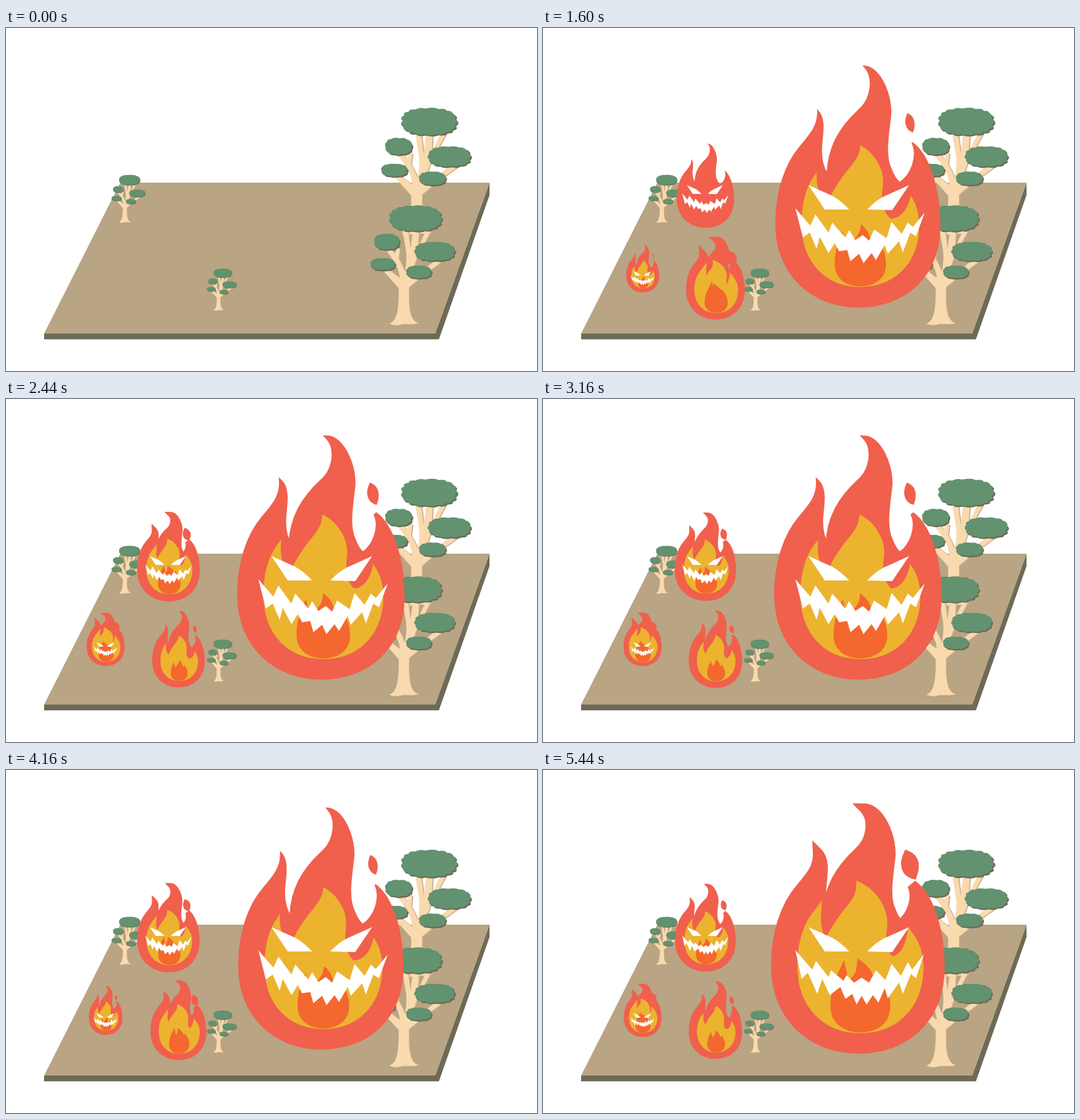
Write an HTML page that moves like this. It is 850 px wide and 550 px high and loops after 5480 ms.

```html
<!DOCTYPE html>
<html lang="en">
<head>
<meta charset="utf-8">
<title>Spreading fire</title>
<style>
  html, body { margin: 0; width: 100%; height: 100%; overflow: hidden; background: #fff; }
  svg { display: block; width: 100%; height: 100%; }
  .red { fill: #f0604d; stroke: #f0604d; }
  .gold { fill: #ecb32f; stroke: #ecb32f; }
  .orange { fill: #f4672f; stroke: #f4672f; }
  .flame path { vector-effect: non-scaling-stroke; stroke-miterlimit: 4; }
  .face { fill: #fff; }
</style>
</head>
<body>
<svg viewBox="0 0 850 550">
  <defs>
    <g id="wood" fill="currentColor">
      <path d="M613 474C626 470 629 450 628 408L636 398L645 408C643 450 646 470 660 473C648 477 640 473 632 475C624 478 618 476 613 474Z"/>
      <path d="M628 417L603 389L608 384L634 404Z"/>
      <path d="M630 412C631 390 626 380 606 354L613 351L622 362L626 352L630 354L628 370C634 380 640 392 641 408Z"/>
      <path d="M633 412C637 395 642 378 640 358L634 322H643L647 354L651 322H661L659 352L674 320H683L660 362C652 380 650 395 644 412Z"/>
      <path d="M640 406L660 394L692 368L704 370L671 394L643 417Z"/>
      <path d="M598 376L614 398L606 392Z"/>
    </g>
    <g id="tree"></g>
  </defs>

  <path fill="#6d6b57" d="M61 490H687L774 248V268L693 499.3H61Z"/>
  <path fill="#b9a483" d="M183 248H774L687 490H61Z"/>
  <g id="trees"></g>
  <g id="fires"></g>
</svg>
<script>
const LOOP = 5480, STEP = 40;
const $ = id => document.getElementById(id);
const rad = deg => deg * Math.PI / 180;

// Scalloped leaf cluster filling a box
function crown(x0, y0, x1, y1, bumps) {
  const cx = (x0 + x1) / 2, cy = (y0 + y1) / 2;
  const at = (i, grow) => {
    const a = i / bumps * 2 * Math.PI + 0.2;
    const bend = v => Math.sign(v) * Math.abs(v) ** 0.8;
    const x = cx + bend(Math.cos(a)) * (x1 - x0) / 2 * grow;
    const y = cy + bend(Math.sin(a)) * (y1 - y0) / 2 * grow;
    return x.toFixed(1) + ' ' + y.toFixed(1);
  };
  let d = 'M' + at(0, 0.97);
  for (let i = 0; i < bumps; i++) d += 'Q' + at(i + 0.5, 1.12) + ' ' + at(i + 1, 0.97);
  return d + 'Z';
}

const crowns = [
  [614, 285, 696, 325, 17],
  [589, 330, 629, 355, 11],
  [654, 343, 717, 373, 14],
  [583, 369, 622, 388, 11],
  [640, 381, 680, 401, 11]
].map(c => crown(...c)).map(d =>
  `<path d="${d}" fill="#6d6b57" transform="translate(1.8 2.2)"/><path d="${d}" fill="#62926f"/>`).join('');

$('tree').innerHTML =
  '<use href="#wood" color="#c9ab8b" transform="translate(1.6 .6)"/>' +
  '<use href="#wood" color="#f9daaf"/>' + crowns;

// x and y of the trunk foot, scale
const trees = [[658, 331, 1.06], [637.5, 476, 1], [190.5, 312, 0.4], [340.5, 453, 0.352]];
$('trees').innerHTML = trees.map(([x, y, s]) =>
  `<use href="#tree" transform="translate(${x} ${y}) scale(${s}) translate(-637 -476)"/>`).join('');

const body = 'M514 61.5C540 61.5 560 112 556 142C552 175 547 205 557 226C562 239 567 245 571 248' +
  'C590 236 601 205 591 184C620 205 635 262 635 316C635 400 578 447 505 447' +
  'C430 447 373 395 373 314C373 262 388 218 412 190C430 169 441 155 440 133' +
  'C451 144 448 165 446 185C444 205 447 222 455 234C457 190 475 160 505 132C526 114 531 79 514 61.5Z';
const drop = 'M584 138C591 141 597 150 591.5 166C582 163 578 151 584 138Z';
const core = 'M509 190C528 200 545 225 543 250C541 270 538 290 556 307C574 307 585 290 589 272' +
  'C598 285 602 305 601 322C598 380 560 414 508 414C455 414 416 378 415 315' +
  'C415 283 422 255 437 235C436 255 442 275 456 288C460 270 468 256 485 233C500 215 508 205 509 190Z';
const heart = 'M510 317C520 325 522 335 524 345C527 350 531 348 536 342C545 355 548 368 548 378' +
  'C548 402 530 413 508 413C484 413 468 400 468 378C468 360 472 345 479 330' +
  'C481 340 484 345 489 350C497 340 508 335 510 317Z';
const eyes = 'M425 252L463 269Q476 276 490 291L451 291ZM586 252L546 270Q532 277 519 291L559 292Z';
const mouths = [
  'M404 289L428 317L436 299L457 328L463 312L484 336L490 324L500 340L512 332L522 341L530 323' +
  'L550 337L558 311L574 330L584 312L592 319L611 296L597 334L588 328L576 360L570 342L552 362L547 348L533 372' +
  'L526 361L513 377L506 362L492 374L487 356L474 358L467 345L457 361L443 335L438 354L427 328L416 336Z',
  'M404 289L431 320L437 306L457 332L461 321L481 338L486 329L498 341L510 333L522 341L533 321' +
  'L548 337L558 311L573 330L584 308L591 320L610 295L597 334L589 327L576 359L570 341L552 366L547 350L537 373' +
  'L528 361L518 376L510 362L502 376L495 359L484 367L476 348L459 361L447 335L439 359L424 325L414 335Z'
];

// start, pulse and extras are counted in steps; speed and phase are degrees; face is centre, top, scale
const fires = [
  { x: 260, y: 320.5, scale: 0.351, start: 34, pulse: 41, extras: 41, max: 7, speed: 50.34, phase: -101, face: [260, 252, 0.357] },
  { x: 159.5, y: 424, scale: 0.2, start: 25, pulse: 25, max: 6, speed: 40.2, phase: 113, face: [159.5, 390, 0.18] },
  { x: 276, y: 461.5, scale: 0.313, start: 15, pulse: 25, max: 6, speed: 113.7, phase: 48 },
  { x: 504, y: 447, scale: 1, start: 29, pulse: 37, ramp: 16, hold: 107, max: 8, low: 0.17, speed: 60, phase: -60, face: [508, 252, 1] }
];

const faceMarkup = ([x, y, s]) =>
  `<g class="face" transform="translate(${x} ${y}) scale(${s}) translate(-508 -252)">
    <path d="${eyes}"/><path class="mouth"/>
  </g>`;

$('fires').innerHTML = fires.map(f =>
  `<g><g class="flame" transform="translate(${f.x} ${f.y}) scale(${f.scale}) translate(-504 -447)">
    <path class="red" d="${body}"/>
    <g><path class="red" d="${drop}"/><path class="gold" d="${core}"/><path class="orange" d="${heart}"/></g>
  </g>${f.face ? faceMarkup(f.face) : ''}</g>`).join('');

fires.forEach((f, i) => {
  f.el = $('fires').children[i];
  f.flame = f.el.firstElementChild;
  f.inner = f.flame.lastElementChild;
  f.mouth = f.el.querySelector('.mouth');
});

// How far the outline swells, in pixels
function swell(f, step) {
  if (step < f.pulse) return 0;
  const n = Math.min(step, f.hold || step);
  const low = f.low || 0;
  const wave = (1 - Math.cos(rad(f.phase + f.speed * (n - 61)))) / 2;
  const ramp = f.ramp ? Math.min(1, (n - f.pulse) / f.ramp) : 1;
  return f.max * ramp * (low + (1 - low) * wave);
}

function draw(time) {
  const t = time % LOOP, step = Math.floor(t / STEP);
  const bite = mouths[Math.floor((t + 80) / 400) % 2];
  for (const f of fires) {
    f.el.setAttribute('opacity', Math.max(0, Math.min(1, (step - f.start + 1) / 6)));
    f.flame.setAttribute('stroke-width', 2 * swell(f, step));
    f.inner.setAttribute('visibility', step < (f.extras || 0) ? 'hidden' : 'visible');
    if (f.mouth) f.mouth.setAttribute('d', bite);
  }
}

const begin = performance.now();
function tick() {
  draw(performance.now() - begin);
  requestAnimationFrame(tick);
}
tick();
</script>
</body>
</html>
```
